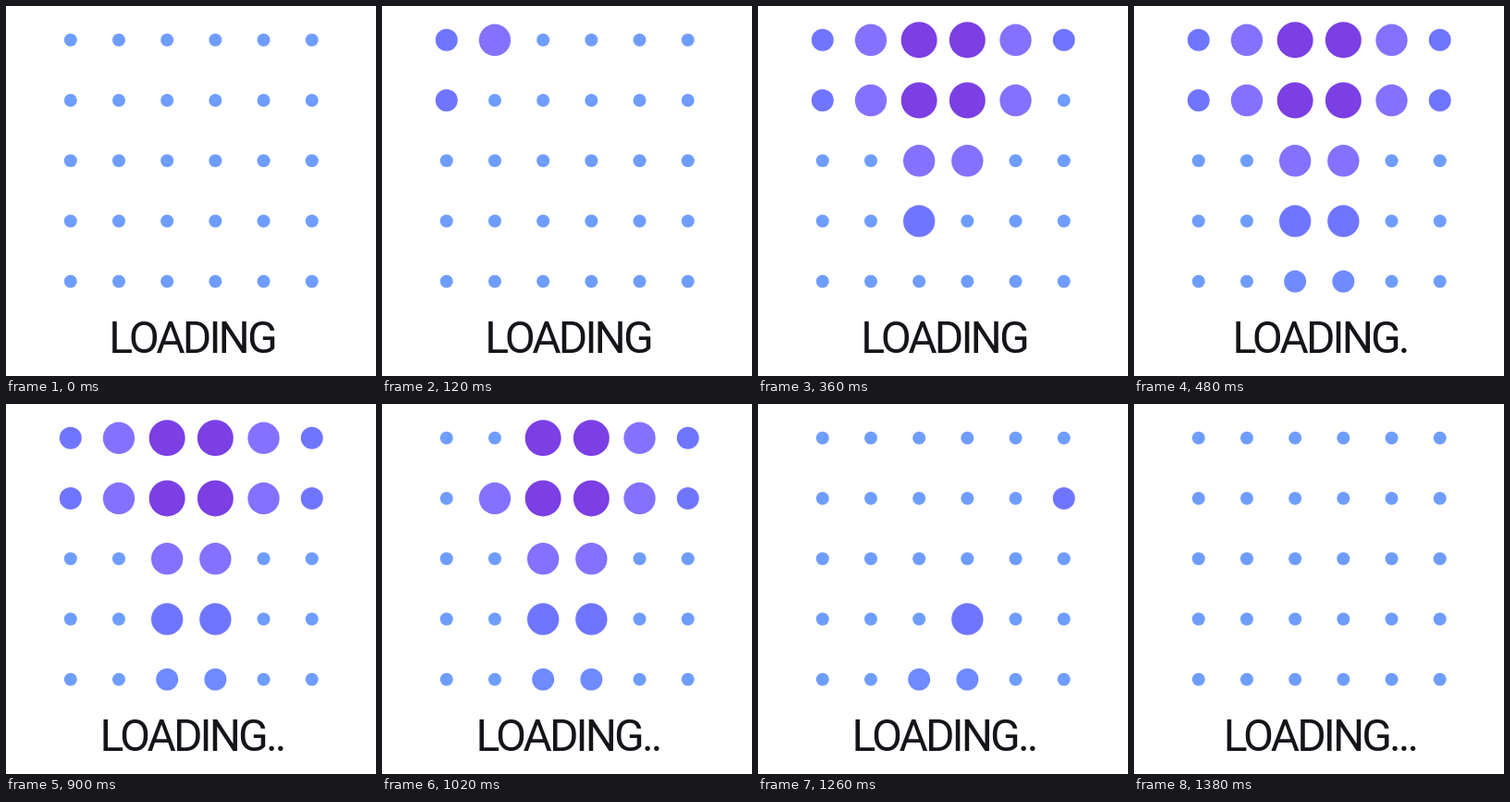
Recreate the animation shown at these times as an HTML page. Size 400 by 400 pixels, loop 1800 ms.

```html
<!DOCTYPE html>
<html lang="en">
<head>
<meta charset="utf-8">
<title>Loading</title>
<style>
  html, body { margin: 0; width: 100%; height: 100%; overflow: hidden; background: #fff; }
  svg { display: block; width: 100%; height: 100%; }
  text { font: 400 48px Roboto, "Liberation Sans", sans-serif; letter-spacing: -2.9px; fill: #141519; }
</style>
</head>
<body>
<svg viewBox="0 0 400 400">
  <g id="dots"></g>
  <text id="label" x="201" y="375" text-anchor="middle">LOADING</text>
</svg>
<script>
  const LOOP = 1800, TICK = 30, STEP = 60, SHRINK_AT = 900;
  const COLS = 6, ROWS = 5;
  const SMALL = { r: 7, rgb: [111, 157, 255] };
  const EDGE = { r: 12, rgb: [112, 117, 255] };
  const SIDE = { r: 17.2, rgb: [133, 113, 255] };
  const CORE = { r: 19.5, rgb: [123, 63, 228] };
  const STEM = { r: 17.2, rgb: [112, 117, 255] };
  const FOOT = { r: 12, rgb: [112, 139, 255] };

  const group = document.getElementById('dots');
  const label = document.getElementById('label');
  const clamp = v => Math.min(1, Math.max(0, v));
  const mix = (a, b, p) => a + (b - a) * p;

  // The large dots form a letter T.
  function largeStyle(row, col) {
    const fromEdge = Math.min(col, COLS - 1 - col);
    if (row < 2) return [EDGE, SIDE, CORE][fromEdge];
    return fromEdge === 2 ? [SIDE, STEM, FOOT][row - 2] : SMALL;
  }

  const dots = [];
  for (let row = 0; row < ROWS; row++) {
    for (let col = 0; col < COLS; col++) {
      const el = document.createElementNS('http://www.w3.org/2000/svg', 'circle');
      el.setAttribute('cx', 69.8 + col * 52.18);
      el.setAttribute('cy', 36.8 + row * 65.25);
      group.append(el);
      dots.push({ el, large: largeStyle(row, col), delay: (row + col) * STEP });
    }
  }

  function draw(time) {
    const t = Math.floor((time % LOOP) / TICK) * TICK;
    for (const { el, large, delay } of dots) {
      const p = clamp((t - delay) / STEP) - clamp((t - SHRINK_AT - delay) / STEP);
      const rgb = SMALL.rgb.map((v, i) => Math.round(mix(v, large.rgb[i], p)));
      el.setAttribute('r', mix(SMALL.r, large.r, p));
      el.setAttribute('fill', `rgb(${rgb})`);
    }
    const count = [480, 900, 1380].filter(at => t >= at).length;
    const text = 'LOADING' + '.'.repeat(count);
    if (label.textContent !== text) label.textContent = text;
  }

  const start = performance.now();
  function frame() {
    draw(performance.now() - start);
    requestAnimationFrame(frame);
  }
  frame();
</script>
</body>
</html>
```
